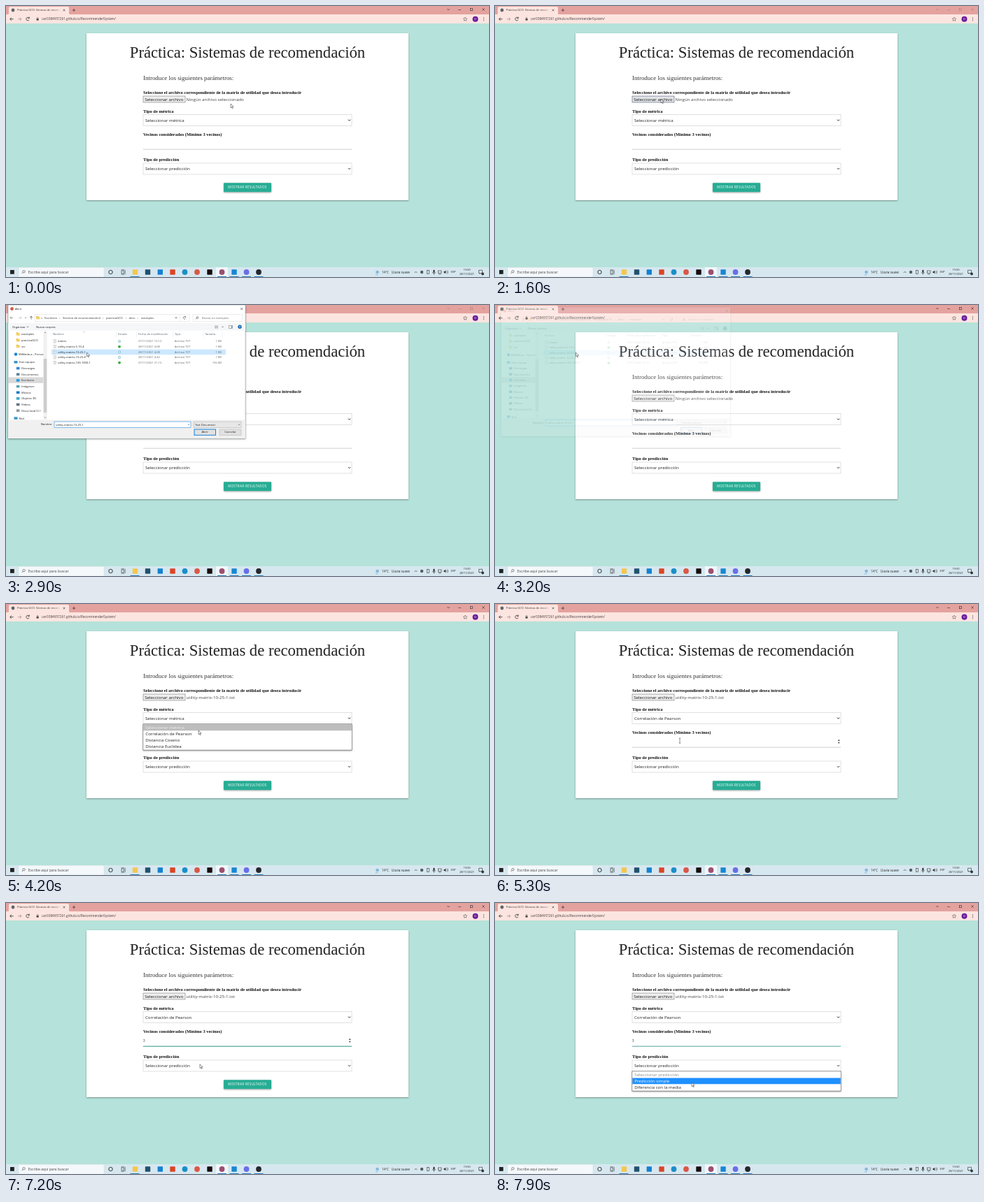
An HTML page that plays this animation: 690x388 px, repeating every 8 s.

```html
<!DOCTYPE html>
<html lang="es">
<head>
<meta charset="utf-8">
<title>Sistemas de recomendación</title>
<style>
html, body { margin: 0; width: 100%; height: 100%; overflow: hidden; background: #b5e2da; }
svg { display: block; width: 100%; height: 100%; }
text { font-family: "Open Sans", "Noto Sans", sans-serif; white-space: pre; }
.serif { font-family: "Liberation Serif", "Noto Serif", serif; }
.bold { font-weight: 700; }
.shadow { filter: drop-shadow(0 1px 1.2px rgba(0, 0, 0, .35)); }
</style>
</head>
<body>
<svg id="stage" viewBox="0 0 690 388"></svg>
<script>
const LOOP = 8000;
const FILE = 'utility-matrix-10-25-1';
const stage = document.getElementById('stage');

// Markup helpers; text is placed by the middle of its capitals
const rect = (x, y, w, h, fill, more = '') =>
  `<rect x="${x}" y="${y}" width="${w}" height="${h}" fill="${fill}" ${more}/>`;
const box = (x, y, w, h, fill, stroke, width = .5) =>
  rect(x, y, w, h, fill, `stroke="${stroke}" stroke-width="${width}"`);
const disc = (x, y, r, fill, more = '') => `<circle cx="${x}" cy="${y}" r="${r}" fill="${fill}" ${more}/>`;
const line = (d, color = '#444', width = .7, more = '') =>
  `<path d="${d}" fill="none" stroke="${color}" stroke-width="${width}" ${more}/>`;
const label = (x, y, size, str, fill = '#222', more = '') =>
  `<text x="${x}" y="${(y + size * .36).toFixed(2)}" font-size="${size}" fill="${fill}" ${more}>${str}</text>`;
const group = (id, body, more = '') => `<g id="${id}" ${more}>${body}</g>`;
const down = (x, y, r = 1.7, color = '#333', width = .8) =>
  line(`M${x - r} ${y - r / 2}l${r} ${r}l${r} ${-r}`, color, width);
const cross = (x, y, r, color = '#333') =>
  line(`M${x - r} ${y - r}l${2 * r} ${2 * r}m0 ${-2 * r}l${-2 * r} ${2 * r}`, color, .6);
const lens = (x, y, r, color = '#444') =>
  line(`M${x - r * .4} ${y + r * .7}l${-r} ${r}`, color) + disc(x + r * .3, y, r, 'none', `stroke="${color}" stroke-width=".6"`);
const folder = (x, y) => rect(x - 2.3, y - 1.8, 4.8, 3.8, '#f5cd62') + rect(x - 2.3, y - 2.3, 2.2, 1, '#dcae3a');

function browser() {
  const windowButtons = down(632, 5, 1.6) + line('M646 5.5h4') +
    box(663.3, 3.5, 3.2, 3.2, 'none', '#333', .6) + cross(682, 5, 1.7);
  return rect(0, 0, 690, 13, '#e4a29f') +
    '<path d="M2 12.5q2-.3 2-2V3q0-2 2-2H88q2 0 2 2v7.500q0 1.700 2 2z" fill="#fce5e0"/>' +
    rect(0, 12, 690, 13, '#fce5e0') +
    disc(10, 6, 2.4, '#606467') +
    label(16, 6, 4.08, 'Práctica GCO: Sitemas de recom', 'url(#fade)') +
    cross(83, 6, 1.4) + line('M94.800 6h4.400m-2.200-2.200v4.400', '#333') +
    group('windowButtons', windowButtons) +
    line('M10.700 18.700h-5m2.200-2.200l-2.200 2.200l2.200 2.200', '#333', .8) +
    line('M17 18.700h5m-2.200-2.200l2.200 2.200l-2.200 2.200', '#a88f8c', .8) +
    line('M33 17.200a2.300 2.300 0 1 0 .2 2.400m.1-4v2h-2', '#333', .8) +
    rect(43.600, 18, 3, 2.600, '#444') + line('M44.200 18v-.8a.9.900 0 0 1 1.800 0v.8', '#444', .5) +
    label(51, 18.800, 4.7, 'usr0384957261.github.io/RecommenderSystem/', '#443b3a') +
    line('M656 16l.8 1.800 2 .2-1.500 1.300.4 2-1.700-1-1.700 1 .4-2-1.500-1.300 2-.2z', '#444', .5) +
    disc(670.500, 18.800, 4, '#6a1b9a') + label(670.500, 18.800, 4, 'D', '#fff', 'text-anchor="middle"') +
    [16.800, 18.800, 20.800].map(y => disc(682.500, y, .55, '#333')).join('');
}

const field = (y, str) => label(196, y, 6.45, str, '#111', 'class="serif bold"');
const select = (y, id, str) => box(196, y - 8, 298, 16, '#fff', '#ccc', .6) +
  label(199, y, 6.12, str, '#222', `id="${id}"`) + down(490.5, y, 1.6, '#222', 1);

function page() {
  return rect(115, 39, 460, 239, '#fff', 'class="shadow"') +
    label(345, 65.4, 22.65, 'Práctica: Sistemas de recomendación', '#222', 'class="serif" text-anchor="middle"') +
    label(196, 103, 8.95, 'Introduce los siguientes parámetros:', '#333', 'class="serif"') +
    field(123.8, 'Seleccione el archivo correspondiente de la matriz de utilidad que desea introducir') +
    rect(196, 129, 60, 9, '#efefef', 'id="fileButton" stroke="#777" stroke-width=".6"') +
    label(198.2, 133.4, 6.17, 'Seleccionar archivo', '#111') +
    label(257.6, 133.4, 6.17, '', '#444', 'id="fileName"') +
    field(150.7, 'Tipo de métrica') + select(163.5, 'metric', '') +
    field(183.7, 'Vecinos considerados (Mínimo 3 vecinos)') +
    line('M196 205.200h298', '#9e9e9e', .5) +
    line('M196 205.200h298', '#26a69a', .9, 'id="focusLine"') +
    label(195.8, 197.2, 5, '3', '#333', 'id="count"') +
    rect(0, 193.5, .5, 7, '#222', 'id="caret"') +
    group('spinner', '<path d="M489.600 196l1.600-2.200 1.600 2.200zm0 1.700l1.600 2.200 1.600-2.200z" fill="#555"/>') +
    field(219.7, 'Tipo de predicción') + select(233, 'prediction', 'Seleccionar predicción') +
    rect(311, 253.3, 68, 13, '#27ad94', 'rx=".8" class="shadow"') +
    label(317, 259.8, 4.63, 'MOSTRAR RESULTADOS', '#fff', 'letter-spacing=".25"');
}

function dropdown(id, top, names) {
  const rows = names.map((name, i) => rect(196.4, top + .5 + i * 9, 297.2, 9, '#fff', 'class="row"') +
    label(199.3, top + 5 + i * 9, 6.1, name, i ? '#222' : '#888', 'class="option"')).join('');
  return group(id, box(196, top, 298, names.length * 9 + 1, '#fff', '#555', .7) + rows, 'class="shadow"');
}

function dialog() {
  const say = (x, y, str, fill = '#222', more = '') => label(x, y, 4.1, str, fill, more);
  const crumbs = [[50, '«'], [55, 'Escritorio'], [76, '›'], [81, 'Sistema de recomendación2'], [138, '›'],
    [143, 'practicaGCO'], [171, '›'], [175.5, 'docs'], [187.5, '›'], [193, 'examples']];
  const heads = [[67, 'Nombre'], [160, 'Estado'], [189, 'Fecha de modificación'], [241, 'Tipo'], [284, 'Tamaño']];
  const files = [['matrix', '27/11/2021 16:12', 0], ['utility-matrix-5-10-4', '28/11/2021 4:08', 1],
    [FILE, '28/11/2021 4:08', 0], ['utility-matrix-10-25-8', '28/11/2021 4:42', 0],
    ['utility-matrix-100-1000-1', '27/11/2021 21:15', 1]];
  const places = ['Descargas', 'Documentos', 'Escritorio', 'Imágenes', 'Música', 'Objetos 3D', 'Vídeos', 'Disco local (C:)'];
  const tints = ['#2f86d6', '#5c8296', '#1e9be0', '#5b9fb5', '#2477c8', '#35a8c4', '#62717c', '#8c989e'];

  const fileRows = files.map(([name, date, kept], i) => {
    const y = 52 + i * 7.65;
    return box(68.5, y - 2.3, 3.2, 4.4, '#fff', '#999', .4) + line(`M69.300 ${y - .8}h1.700m-1.700 1.500h1.700`, '#999', .4) +
      say(74, y, name) + disc(162, y, 1.7, kept ? '#35a83a' : '#d7edf2', `stroke="${kept ? '#35a83a' : '#55a4b5'}" stroke-width=".5"`) +
      say(189, y, date, '#666') + say(241, y, 'Archivo TXT', '#666') +
      say(308, y, i === 4 ? '196 KB' : '1 KB', '#666', 'text-anchor="end"');
  }).join('');
  const sidebar = ['examples', 'practicaGCO', 'src'].map((name, i) =>
      folder(17, 41.7 + i * 8.7) + say(22, 41.7 + i * 8.7, name)).join('') +
    disc(14, 70.5, 2.2, '#1683d8') + say(18, 70.5, 'MiNimbus - Person') +
    rect(11.5, 80, 5, 3.5, '#3695d0') + say(18.5, 82, 'Este equipo') +
    rect(3, 103.4, 50.5, 8.4, '#d9d9d9') +
    places.map((name, i) => rect(14.8, 88.8 + i * 8.65, 4.6, 3.6, tints[i]) + say(22, 90.6 + i * 8.65, name)).join('') +
    rect(11.5, 160.3, 5, 3.5, '#3695d0') + say(18.5, 162.3, 'Red') +
    rect(53.5, 37, 5, 127, '#f0f0f0') + rect(53.7, 77, 4.6, 77, '#cdcdcd') +
    down(56, 161, 1.1, '#555', .6) + line('M55 40l1-1 1 1', '#555', .6);
  const top = disc(8.5, 5.5, 2.4, '#d45a45') + say(13, 5.5, 'Abrir') + cross(336.7, 5.5, 1.6) +
    line('M10 18.300h-4m1.700-1.700l-1.700 1.700l1.700 1.700', '#777') +
    line('M18 18.300h4m-1.700-1.700l1.700 1.700l-1.700 1.700', '#bbb') + down(28, 18.3, 1.1, '#777') +
    line('M36 20.500v-4.400m-1.700 1.700l1.700-1.700 1.700 1.700', '#444') +
    box(41, 13.5, 221, 10, '#fff', '#d9d9d9') + folder(45.5, 18.3) +
    crumbs.map(([x, str]) => say(x, 18.3, str, '#333')).join('') +
    down(243, 18.3, 1.4, '#444') + line('M248.500 13.500v10', '#ddd', .5) +
    line('M256.500 17.200a1.800 1.800 0 1 0 .1 2m.1-3v1.300h-1.400', '#444', .6) +
    box(267, 13.5, 70.5, 10, '#fff', '#d9d9d9') + lens(273, 18, 1.3) + say(280, 18.3, 'Buscar en examples', '#666');
  const tools = rect(3, 26, 339, 10.5, '#f5f6f7') + say(9, 31.3, 'Organizar') + down(31, 31.3, 1, '#333') +
    say(43, 31.3, 'Nueva carpeta') + line('M298 30h5m-5 1.500h5m-5 1.500h5', '#789', .6) + down(309.5, 31.3, 1, '#333') +
    box(318.5, 29.3, 5, 4, '#fff', '#667', .5) + rect(321.5, 29.3, 2, 4, '#89aabd') +
    disc(334, 31.3, 2.7, '#1769b3') + label(334, 31.3, 4, '?', '#fff', 'class="bold" text-anchor="middle"');
  const foot = rect(3, 164.5, 339, 26.5, '#f0f0f0') + say(66.5, 171, 'Nombre:', '#222', 'text-anchor="end"') +
    box(69, 167, 195, 8.6, '#fff', '#0078d7') + say(71, 171.2, '', '#222', 'id="chosen"') + down(261, 171.3, 1, '#555') +
    rect(70.5, 168.5, .4, 5.5, '#222', 'id="nameCaret"') +
    box(268, 167, 68, 8.6, '#e7e7e7', '#adadad') + say(270, 171.2, 'Text Document') + down(333, 171.3, 1, '#555') +
    box(269, 178, 30.500, 8.3, '#e1e1e1', '#0078d7', .9) + say(284.2, 182, 'Abrir', '#222', 'text-anchor="middle"') +
    box(305, 178, 31, 8.3, '#e1e1e1', '#adadad') + say(320.5, 182, 'Cancelar', '#222', 'text-anchor="middle"');
  return group('dialog', box(3, 0, 339, 191, '#fff', '#8a9a9a') + top + tools +
    heads.map(([x, str]) => say(x, 42, str, '#5a6778')).join('') + line('M110 39l1.200-1 1.200 1', '#888', .5) +
    line('M157.500 38v8m29-8v8m52-8v8m43-8v8m28-8v8', '#e5e5e5', .5) +
    rect(65, 63.5, 249, 7.6, '#e5f3ff', 'id="picked"') + fileRows + sidebar + foot, 'class="shadow"');
}

function taskbar() {
  const square = (x, color) => rect(x - 3.7, 377.3, 7.4, 7.4, color, 'rx=".6"');
  const round = (x, color) => disc(x, 381, 3.9, color);
  const running = [184, 308.5, 326, 343.5, 361];
  return rect(0, 374, 690, 14, '#d6e7ef') + rect(300, 374, 17, 14, '#f0f7fa') +
    rect(6, 378, 5.8, 5.8, '#222') +
    box(18, 374.2, 122, 13.800, '#f4f8fa', '#d0d9dd', .4) + lens(25, 380.2, 1.7) +
    label(31.8, 381, 5.07, 'Escribe aquí para buscar', '#444') +
    disc(149.500, 381, 2.7, 'none', 'stroke="#222" stroke-width=".9"') +
    box(165, 379, 3.5, 4, 'none', '#333', .6) + line('M164.500 377.800h4.500m-4.500 6.400h4.500m1.200-6.400v6.400', '#333', .6) +
    square(184.5, '#f3c751') + square(202.5, '#20516f') + square(220.3, '#1481d2') + square(238, '#dc4425') +
    round(255.5, '#1a8fc9') + round(273, '#da5745') + square(291, '#170c0e') + round(308.5, '#9d4f70') +
    square(326, '#1687d4') + round(343.500, '#686ee8') + round(361, '#25272c') +
    running.map(x => rect(x - 6.5, 387, 13, 1, '#287bbd')).join('') +
    disc(530.5, 381, 2.3, '#85b9db') + line('M529 384l-.5 1.500m2.500-1.500l-.5 1.500', '#3e91ce', .6) +
    label(537, 381, 4.5, '14°C') + label(551, 381, 4.55, 'Lluvia suave') +
    line('M583.700 382l1.800-1.800 1.800 1.800', '#333') + disc(594, 381, 2.2, '#555c60') +
    box(601.5, 378.5, 2.8, 4.8, 'none', '#333', .6) + rect(610.4, 377.8, 2, 4, '#222', 'rx="1"') +
    line('M609.500 381a1.900 1.900 0 0 0 3.800 0m-1.900 2v1.700', '#222', .6) +
    box(617.5, 379, 4.5, 3.3, 'none', '#333', .6) + line('M618 384h3.500', '#333', .6) +
    '<path d="M625.500 380h1.200l1.500-1.500v5l-1.500-1.500h-1.200z" fill="#333"/>' + line('M629.500 379.500q1.200 1.500 0 3m1.200-4q1.800 2.500 0 5', '#333', .5) +
    label(639, 381, 4.1, 'ESP', '#222', 'text-anchor="middle"') +
    label(658.5, 377.8, 3.95, '19:50', '#222', 'text-anchor="middle"') +
    label(658.5, 384, 3.95, '28/11/2021', '#222', 'text-anchor="middle"') +
    line('M675.500 378.300h5v4.200h-2.500l-1 1.200v-1.200h-1.500z', '#222', .6) + disc(681, 383.500, 1.9, '#333');
}

const arrow = '<path id="arrow" d="M0 0v5.700l1.300-1.200 1 2.200.9-.4-1-2.100h1.900z" fill="#fff" stroke="#222" stroke-width=".5"/>';
const beam = line('M-1.200-3.500h2.400m-1.200 0v7m-1.200 0h2.400', '#222', .5, 'id="beam"');

stage.innerHTML = '<defs><linearGradient id="fade"><stop offset=".86" stop-color="#333"/>' +
  '<stop offset="1" stop-color="#333" stop-opacity=".15"/></linearGradient></defs>' +
  rect(0, 0, 690, 388, '#b5e2da') + page() + browser() +
  dropdown('metrics', 172, ['Seleccionar métrica', 'Correlación de Pearson', 'Distancia Coseno', 'Distancia Euclídea']) +
  dropdown('predictions', 241, ['Seleccionar predicción', 'Predicción simple', 'Diferencia con la media']) +
  taskbar() + dialog() + group('pointer', arrow + beam);

const ui = Object.fromEntries([...stage.querySelectorAll('[id]')].map(el => [el.id, el]));

// Tables of [time, ...values]
const POINTER = [[0, 321, 140], [80, 321, 140], [450, 278, 137], [900, 240, 134], [1350, 237, 133], [1750, 237, 133],
  [2100, 145, 96], [2450, 115.5, 68], [3220, 115.5, 68], [3500, 215, 120], [3900, 275, 162], [4030, 275, 163],
  [4200, 275, 181], [4400, 273, 184], [4900, 273, 184], [5400, 263, 197], [6450, 263, 197],
  [6800, 277, 230], [7400, 277, 231], [7600, 281, 252], [7820, 281, 252], [7900, 281, 257]];
const DIALOG = [[1650, 0, .95], [1880, 1, 1], [3080, 1, 1], [3200, .17, .967], [3240, 0, .96]];
const FOCUS = [[5400, 0], [5700, 1], [7400, 1], [7650, .75]];

function tween(table, t, ease = u => u) {
  const i = table.findIndex(row => row[0] > t);
  if (i === 0) return table[0].slice(1);
  if (i < 0) return table[table.length - 1].slice(1);
  const [t0, ...a] = table[i - 1], [t1, ...b] = table[i];
  const u = ease((t - t0) / (t1 - t0));
  return a.map((v, k) => v + (b[k] - v) * u);
}
const smooth = u => u * u * (3 - 2 * u);
const show = (el, on) => { el.style.display = on ? '' : 'none'; };
const write = (el, str) => { if (el.textContent !== str) el.textContent = str; };

function highlight(list, active) {
  list.querySelectorAll('.row').forEach((row, i) =>
    row.setAttribute('fill', i !== active ? '#fff' : i ? '#1e90ff' : '#bdbdbd'));
  list.querySelectorAll('.option').forEach((option, i) =>
    option.setAttribute('fill', i === active ? (i ? '#fff' : '#eee') : i ? '#222' : '#888'));
}

function render(t) {
  const within = (from, to) => t >= from && t < to;

  const [x, y] = tween(POINTER, t, smooth);
  ui.pointer.setAttribute('transform', `translate(${x} ${y})`);
  const overText = within(5000, 6560);
  show(ui.arrow, !overText);
  show(ui.beam, overText);

  const [alpha, scale] = tween(DIALOG, t);
  show(ui.dialog, alpha > 0);
  ui.dialog.setAttribute('opacity', alpha);
  ui.dialog.setAttribute('transform', `translate(172.500 95.500) scale(${scale}) translate(-172.500 -95.500)`);
  show(ui.picked, t >= 2430);
  ui.picked.setAttribute('fill', t < 2700 ? '#e5f3ff' : '#cce8ff');
  write(ui.chosen, t < 2750 ? '' : FILE);
  show(ui.nameCaret, t < 2750);
  ui.windowButtons.setAttribute('opacity', within(1380, 3130) ? .3 : 1);

  ui.fileButton.setAttribute('fill', within(850, 1800) ? '#e2e4e8' : '#efefef');
  ui.fileButton.setAttribute('stroke', within(850, 1800) ? '#4c5a70' : '#777');
  write(ui.fileName, t < 3350 ? 'Ningún archivo seleccionado' : FILE + '.txt');
  write(ui.metric, t < 4880 ? 'Seleccionar métrica' : 'Correlación de Pearson');

  show(ui.metrics, within(4000, 4880));
  highlight(ui.metrics, t < 4280 ? 0 : 1);
  show(ui.predictions, t >= 7380);
  highlight(ui.predictions, t < 7560 ? 0 : 1);

  ui.focusLine.setAttribute('opacity', tween(FOCUS, t)[0]);
  show(ui.spinner, within(5300, 7380));
  show(ui.count, t >= 6550);
  show(ui.caret, within(5450, 6050) || within(6550, 7050));
  ui.caret.setAttribute('x', t < 6550 ? 196 : 199);
}

function frame() {
  render(performance.now() % LOOP);
  requestAnimationFrame(frame);
}
frame();
</script>
</body>
</html>
```
